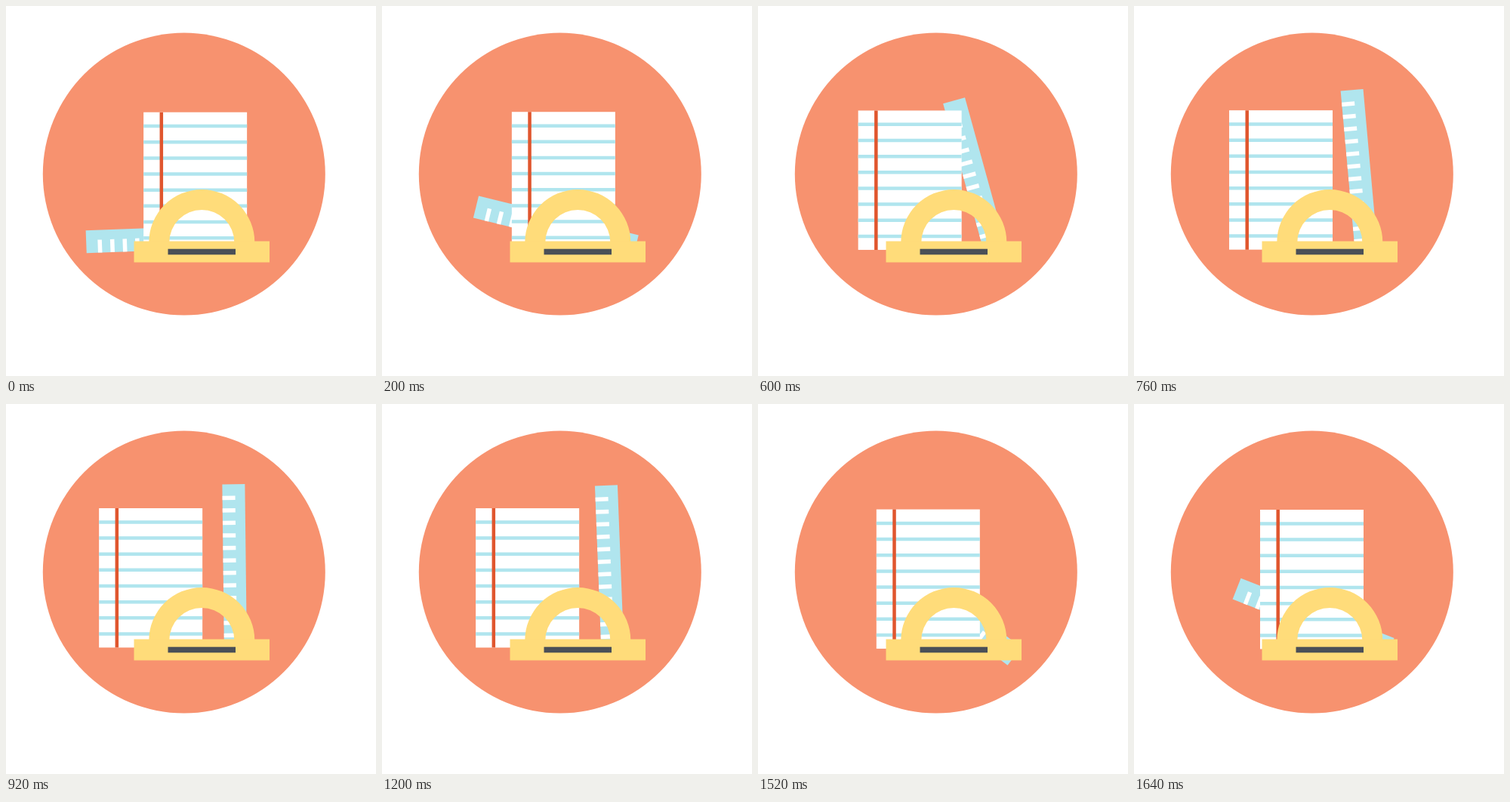
An HTML page for the animation above (1.68 s loop, 490 px wide and 490 px high).

```html
<!DOCTYPE html>
<html lang="en">
<head>
<meta charset="utf-8">
<title>School supplies</title>
<style>
  html, body { margin: 0; width: 100%; height: 100%; overflow: hidden; background: #fff; }
  svg { display: block; width: 100vw; height: 100vh; }
</style>
</head>
<body>
<svg viewBox="0 0 490 490">
  <circle cx="235.8" cy="222.6" r="187" fill="#f7926f"/>
  <g id="ruler">
    <rect x="-15" y="-109" width="30" height="218" fill="#b0e5ee"/>
    <path id="ticks" stroke="#fff" stroke-width="5.5"/>
  </g>
  <g id="paper">
    <rect width="137" height="184.5" fill="#fff"/>
    <path id="lines" stroke="#b0e5ee" stroke-width="4.5"/>
    <path d="M23.7 0V184.5" stroke="#e0562e" stroke-width="4.5"/>
  </g>
  <g fill="#ffdc7a">
    <path d="M189.3 313a70 70 0 0 1 140 0h-27a43 43 0 0 0-86 0z"/>
    <rect x="169.5" y="311.5" width="179.5" height="28"/>
  </g>
  <rect x="214.5" y="321.7" width="89.5" height="7.6" fill="#4a4f57"/>
</svg>
<script>
const LOOP = 1680, STEP = 40, RETURN_AT = 1200, DURATION = 1040;
const el = id => document.getElementById(id);

const strokes = (count, x, y, gap, length) =>
  Array.from({ length: count }, (_, i) => `M${x} ${y + i * gap}h${length}`).join('');
el('ticks').setAttribute('d', strokes(12, -15, -91, 16.55, 17));
el('lines').setAttribute('d', strokes(8, 0, 18.4, 21.15, 137));

// cubic-bezier(x1, 0, x2, 1)
function ease(x, x1, x2) {
  if (x <= 0) return 0;
  if (x >= 1) return 1;
  let lo = 0, hi = 1, s;
  for (let i = 0; i < 24; i++) {
    s = (lo + hi) / 2;
    const u = 1 - s;
    if (3 * u * u * s * x1 + 3 * u * s * s * x2 + s ** 3 < x) lo = s; else hi = s;
  }
  return s * s * (3 - 2 * s);
}

// 1 = ruler lying down, 0 = ruler upright
const lean = t => t < RETURN_AT
  ? 1 - ease((t + 20) / DURATION, .33, .33)
  : ease((t - 1130) / DURATION, .26, .3);

function draw(now) {
  const q = lean(Math.floor(now % LOOP / STEP) * STEP);
  el('paper').setAttribute('transform', `translate(${122.7 + 59.5 * q} ${138 + 2.7 * q})`);
  el('ruler').setAttribute('transform',
    `translate(${303.3 - 88.3 * q} ${214.6 + 93.7 * q}) rotate(${-92.2 * q})`);
}

const start = performance.now();
function tick() {
  draw(performance.now() - start);
  requestAnimationFrame(tick);
}
tick();
</script>
</body>
</html>
```
